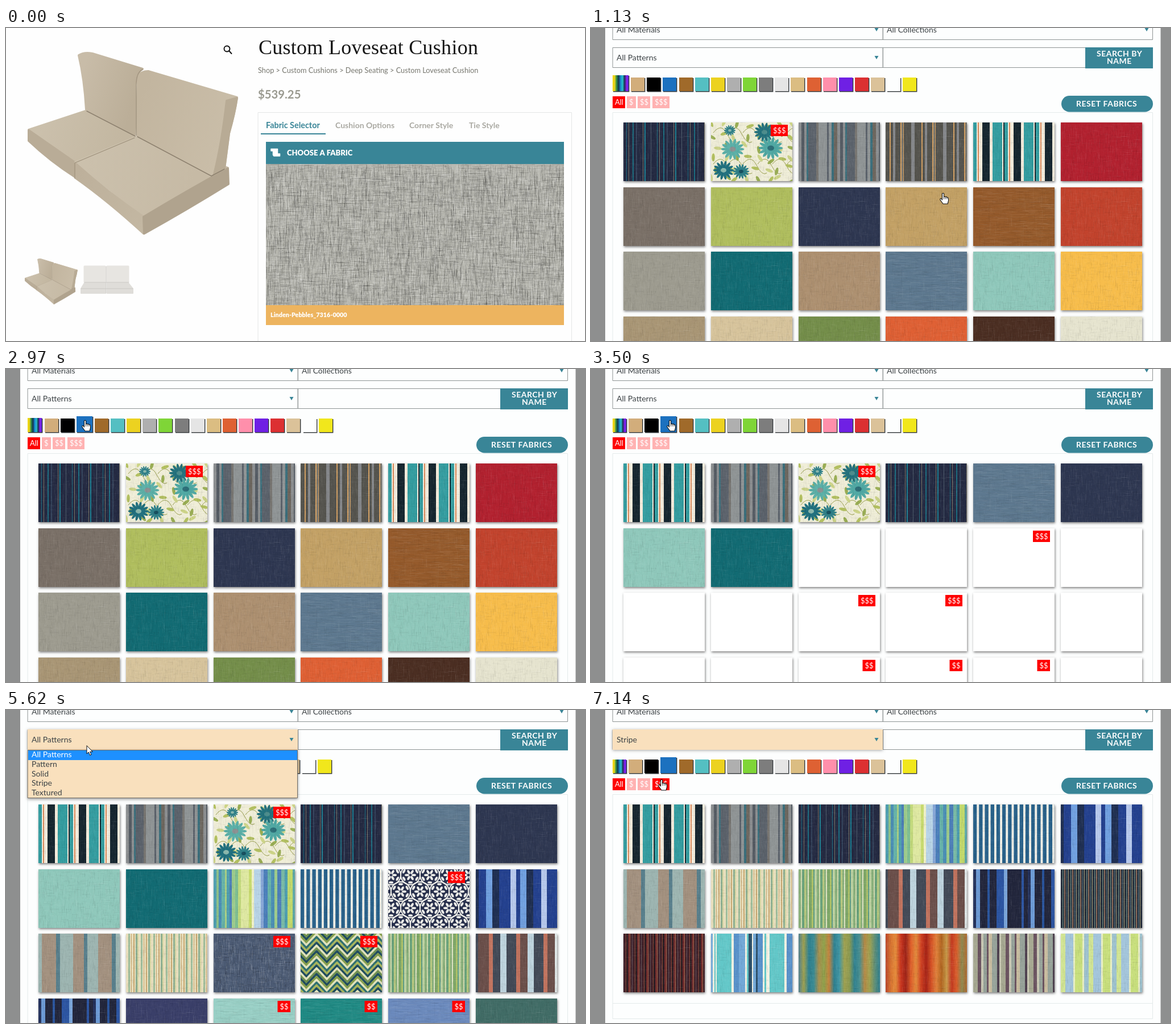
These frames come from a looping animation (1018x550 px, 8 s). An HTML page with a canvas:

```html
<!DOCTYPE html>
<html lang="en">
<head>
<meta charset="utf-8">
<title>Custom cushion fabric selector</title>
<style>
html, body { margin: 0; width: 100%; height: 100%; overflow: hidden; background: #fff; }
canvas { display: block; }
</style>
</head>
<body>
<canvas id="stage" width="1018" height="550"></canvas>
<script>
const W = 1018, H = 550, LOOP = 8000;
const TEAL = '#398597', RED = '#fe0000';
const TILE_W = 143, TILE_H = 103;
const screen2d = document.getElementById('stage').getContext('2d');
let g = screen2d; // current drawing context

const clamp = v => Math.max(0, Math.min(1, v));
const ramp = (t, from, to) => { const p = clamp((t - from) / (to - from)); return p * p * (3 - 2 * p); };

function random(seed) {
  return () => (seed = seed * 16807 % 2147483647) / 2147483647;
}

function layer(w, h, paint) {
  const c = document.createElement('canvas'), outer = g;
  c.width = w; c.height = h;
  g = c.getContext('2d');
  paint();
  g = outer;
  return c;
}

function rect(color, x, y, w, h) { g.fillStyle = color; g.fillRect(x, y, w, h); }

function frame(color, x, y, w, h) {
  g.strokeStyle = color; g.lineWidth = 1;
  g.strokeRect(x + .5, y + .5, w - 1, h - 1);
}

function shape(d, fill, stroke, width = 1) {
  const path = new Path2D(d);
  g.lineJoin = 'round'; g.lineCap = 'round';
  if (fill) { g.fillStyle = fill; g.fill(path); }
  if (stroke) { g.strokeStyle = stroke; g.lineWidth = width; g.stroke(path); }
}

function disc(color, x, y, rx, ry = rx, turn = 0) {
  g.fillStyle = color;
  g.beginPath(); g.ellipse(x, y, rx, ry, turn, 0, 7); g.fill();
}

function text(str, x, y, size, color, weight = 400, spacing = 0, family = 'Lato, sans-serif') {
  g.font = `${weight} ${size}px ${family}`;
  g.letterSpacing = spacing + 'px';
  g.fillStyle = color;
  g.fillText(str, x, y);
}

function shadow(color, blur, dx = 0, dy = 0) {
  g.shadowColor = color; g.shadowBlur = blur;
  g.shadowOffsetX = dx; g.shadowOffsetY = dy;
}
const noShadow = () => shadow('transparent', 0);

// Short light and dark threads laid over a cloth colour.
function weave(w, h, power, upright = .6, long = 12, density = 7) {
  const rnd = random(w * 31 + h);
  for (let i = w * h / density; i > 0; i--) {
    const tone = rnd() < .5 ? '0,0,0' : '255,255,255';
    const len = 2 + rnd() * long, up = rnd() < upright;
    rect(`rgba(${tone},${rnd() * power})`, rnd() * w | 0, rnd() * h | 0, up ? 1 : len, up ? len : 1);
  }
}

// Repeating stripes: "colour width colour width ..."
const STRIPES = {
  teal: '349da0 6 f3ecdc 2 d98a5c 2 f3ecdc 6 16262f 13 f3ecdc 5 349da0 17 f3ecdc 2 16262f 2',
  gray: '8b8e90 5 555c64 5 8b8e90 4 3b6f7c 3 5b626b 14 777571 4 8f9495 15 5b626b 3 8f9495 5 3b6f7c 4 6d675f 6',
  navy: '242a42 5 1c6d80 1 242a42 3 777364 1 242a42 6 1c6d80 2 242a42 4 34435c 2 242a42 10 777364 1 242a42 2 1c7d90 2 242a42 9 4c5a6a 1 242a42 5',
  brown: '55544e 7 d3a063 2 55544e 4 85878a 4 55544e 9 d3a063 2 77746b 3 d3a063 1 55544e 13 85878a 6 55544e 5',
  multi: '4f9fb0 5 8dc08b 4 4b8fb5 5 66b3a9 6 a8cf86 3 4f9fb0 5 4c7fb8 4 9ccb8c 6 7fbf93 5 c3da7c 5 dfe9a2 14 c9dc70 5 f0f1c8 4 b9d5e8 12 86a6d6 5 4b7fbb 7 66b3a9 6 4b8fb5 6 9ccb8c 5 4c7fb8 7 79bba6 6 4f9fb0 5 c3da6c 9 5fa9a6 4',
  pin: '28618a 6.5 eeeee6 3.7',
  royal: '1f2f52 5 24418f 13 70a0e0 11 1f2f52 12 24418f 20 b6c8ec 10 24418f 7 70a0e0 11 1f2f52 12 24418f 14 b6c8ec 10 24418f 18',
  taupe: '9db5b1 6 a3917f 25 587f8c 7 9db5b1 23 a3917f 19 587f8c 6 9db5b1 19 a3917f 24 587f8c 7 9db5b1 7',
  sage: 'e9dfbd 4 9fbe9c 3 e9dfbd 2 c8a871 1 e9dfbd 3 c8a871 2 e9dfbd 2 8fb193 3 d9d8a4 2',
  meadow: '8bb17c 4 d3dcb0 2 6ba37c 4 b9c97f 3 8bb17c 3 dfe4c4 2 7fa869 5 adc167 3 5d9a85 2 bbd1a0 4',
  rust: '434a57 4 6b4f4a 19 c1735e 7 434a57 13 bed4de 11 434a57 17 c1735e 7 6b4f4a 13 bed4de 11 434a57 17 c1735e 7 6b4f4a 13 dfe6e6 5',
  deep: '24325c 5 6d9bd6 7 22263c 13 28539b 4 22263c 12 2c55a2 13 7aa5da 6 22263c 25 2c55a2 4 22263c 7',
  dark: '232c3a 3 6d8f84 1 2c3744 2 8a6a58 2 232c3a 2 55707a 1 2c3744 2 a39b75 1',
  maroon: '42222a 4 8a4a38 1 2b1c22 3 6d2b2c 3 a4684a 1 42222a 3 5a5058 1',
  lagoon: '73a9d8 3 f2f2e4 3 63c8c9 2 f2f2e4 2 63c8c9 26 f2f2e4 4 5a93cb 9 73a9d8 11 f2f2e4 3 63c8c9 3 2d4f68 6 f2f2e4 2 73a9d8 5 2d4f68 3 5a93cb 9 f2f2e4 3 63c8c9 3 f2f2e4 6 63c8c9 26 f2f2e4 4 5a93cb 12',
  mix: 'a7a992 8 6b5460 6 c9c8b4 4 97a39a 6 6b5460 3 c9bda0 6 97a39a 9 4f4250 4 c9c8b4 3',
  lime: 'd2e594 8 a4c6dc 14 e9efc4 3 c9e07d 13 e9efc4 3 9fc3cf 8'
};

const BLENDS = {
  blur: '4f7f90 a0a251 2f8190 3a8a92 a78f4d 8fa24c c4843f 2f8190 4197a5 a0a251 8d9a50 2f8190 4a8f8f b58a45 a0a251 5e8f78 2f8190',
  fire: 'b9452a d97431 e58b3a c8341d 9e2418 e0602b e28a3c cf4021 a82417 d65326 e0803a b1651f c79a4a c43a20 d9602c 8f8a50 b06a30'
};

function stripes(spec) {
  const parts = spec.split(' ');
  for (let x = 0, i = 0; x < TILE_W; i = (i + 2) % parts.length) {
    const w = +parts[i + 1];
    rect('#' + parts[i], x, 0, w, TILE_H);
    x += w;
  }
}

function blend(spec) {
  const grad = g.createLinearGradient(0, 0, TILE_W, 0);
  spec.split(' ').forEach((c, i, all) => grad.addColorStop(i / (all.length - 1), '#' + c));
  rect(grad, 0, 0, TILE_W, TILE_H);
}

function flower(x, y, r, color, heart) {
  for (let a = 0; a < 6.2; a += .45) {
    disc(color, x + Math.cos(a) * r * .6, y + Math.sin(a) * r * .52, r * .42, r * .13, a);
  }
  disc(heart, x, y, r * .28, r * .22);
}

const PAINTERS = {
  floral() {
    rect('#f0eed8', 0, 0, TILE_W, TILE_H);
    const rnd = random(77);
    for (let i = 0; i < 12; i++) {
      const x = i % 6 * 26 + 4, y = (i / 6 | 0) * 55 + 18;
      shape(`M${x} ${y} q14 -18 24 2 t18 14`, null, '#9aa04e', 1);
    }
    for (let i = 0; i < 48; i++) {
      disc(['#b3c060', '#cdd488', '#9aae54'][i % 3], i % 8 * 19 + rnd() * 12, (i / 8 | 0) * 19 + rnd() * 12, 7, 2.8, rnd() * 6);
    }
    flower(94, 17, 18, '#23717c', '#4b8c8c');
    flower(38, 47, 20, '#5bb0a8', '#8d9394');
    flower(105, 45, 21, '#4fa8a3', '#2d6f78');
    flower(22, 84, 18, '#1f6f7d', '#89b7ac');
    flower(53, 86, 14, '#2d7f88', '#174f5e');
    flower(33, 14, 10, '#2d7f88', '#89b7ac');
  },
  rosette() {
    rect('#272f4c', 0, 0, TILE_W, TILE_H);
    for (let row = -1; row < 5; row++) for (let col = -1; col < 6; col++) {
      const x = col * 34 + (row & 1) * 17 + 5, y = row * 29 + 10;
      for (let k = 0; k < 6; k++) {
        const a = k * Math.PI / 3, c = Math.cos(a), s = Math.sin(a);
        disc('#f1f1ec', x + c * 6, y + s * 6, 4, 2.1, a);
        disc('#f1f1ec', x + Math.cos(a + .52) * 13, y + Math.sin(a + .52) * 13, 4, 2, a + 2.09);
      }
      g.strokeStyle = '#f1f1ec'; g.lineWidth = 2;
      g.beginPath(); g.arc(x, y, 17, 0, 7); g.stroke();
    }
  },
  chevron() {
    rect('#e2e4bd', 0, 0, TILE_W, TILE_H);
    const bands = ['#1f4c5e', '#86a04d', '#e2e4bd', '#2f6f70', '#a7b65b', '#1f4c5e', '#e2e4bd', '#6f9150'];
    for (let y = -30, i = 0; y < 140; y += 5, i++) {
      let d = `M-26 ${y}`;
      for (let k = 0; k < 10; k++) d += ` l18 ${k % 2 ? 19 : -19}`;
      shape(d, null, bands[i % 8], 3.8);
    }
  }
};

const clothCache = {};
function cloth(name) {
  return clothCache[name] ??= layer(TILE_W, TILE_H, () => {
    if (STRIPES[name]) stripes(STRIPES[name]);
    else if (BLENDS[name]) blend(BLENDS[name]);
    else if (PAINTERS[name]) PAINTERS[name]();
    else rect('#' + name.slice(0, 6), 0, 0, TILE_W, TILE_H);
    const flat = name.endsWith('-');
    weave(TILE_W, TILE_H, name === '4c5b74' ? .12 : .045, flat ? .1 : .75, flat ? 24 : 14);
  });
}

const ALL = ('navy floral gray brown teal b2212f 7a7067 b0be5e 2e3751 c3a165 955a2b- c2432d ' +
  '9d9b8f 126b73 ad9070 5d788f- 8fc8bb f7bd4b a99675 d7c49c 748e4a df6034 4b2e22 e6e4cf').split(' ');
const BLUE = ('teal gray floral navy 5d788f- 2e3751 8fc8bb 126b73 multi pin rosette royal ' +
  'taupe sage 4c5b74 chevron meadow rust deep 3a3f69 99d0c6- 1f8a84- 6b8abd- 416c66').split(' ');
const STRIPED = ('teal gray navy multi pin royal taupe sage meadow rust deep dark ' +
  'maroon lagoon blur fire mix lime').split(' ');
const BADGES = { floral: '$$$', rosette: '$$$', '4c5b74': '$$$', chevron: '$$$', '99d0c6-': '$$', '1f8a84-': '$$', '6b8abd-': '$$' };

function tiles(names, loaded) {
  names.forEach((name, i) => {
    const x = Math.round(57 + i % 6 * 153.8), y = Math.round(166 + (i / 6 | 0) * 113.6);
    shadow('rgba(0,0,0,.5)', 4, 1, 2);
    rect('#fff', x, y, TILE_W, TILE_H);
    noShadow();
    if (i < loaded) g.drawImage(cloth(name), x, y);
    const badge = BADGES[name];
    if (badge) {
      const w = badge.length * 7.5 + 7.5;
      rect(RED, x + 135 - w, y + 4, w, 20);
      text(badge, x + 139 - w, y + 19, 13, '#fff');
    }
  });
}

function shade(x0, y0, x1, y1, from, to) {
  const grad = g.createLinearGradient(x0, y0, x1, y1);
  grad.addColorStop(0, from);
  grad.addColorStop(1, to);
  return grad;
}

function sofa() {
  const part = (d, color) => shape(d, color, color, 4);
  part('M40 179 L140 146 L226 190 L122 236 Z', shade(60, 170, 200, 210, '#cbc0ac', '#c3b7a1'));
  part('M40 180 L122 237 L122 262 Q78 234 40 198 Z', '#b9ac97');
  part('M122 236 L228 192 L390 246 Q320 285 242 331 Z', shade(140, 240, 330, 270, '#cbc0ac', '#c6baa5'));
  part('M122 238 Q180 290 242 332 V361 Q180 304 122 263 Z', shade(122, 250, 242, 345, '#bdb09b', '#c3b7a2'));
  part('M242 332 Q320 285 390 247 L391 274 Q320 318 243 361 Z', '#b0a38e');
  shape('M121 264 V237 L226 193', null, '#9d907b', 1.2);
  part('M128 48 Q138 42 152 45 L240 72 Q229 78 227 100 Q230 150 226 188 L141 143 Q138 90 128 48 Z',
    shade(130, 90, 228, 120, '#c8bca8', '#bbae98'));
  part('M232 84 Q238 76 250 76 L406 122 Q402 150 392 185 L384 247 L362 258 Q295 222 231 189 Z',
    shade(232, 130, 385, 180, '#c2b59f', '#c9bda8'));
  part('M388 128 L406 123 Q402 150 392 185 L384 246 L366 257 Q380 200 388 128 Z', '#b8ab95');
  shape('M142 146 L227 190 M231 191 L361 260 L384 248', null, '#8e8270', 1.5);
  shape('M240 73 Q229 78 229 100 V189', null, '#a39681', 1.5);
}

function scaled(x, y, k, paint) {
  g.save(); g.translate(x, y); g.scale(k, k); paint(); g.restore();
}

const page = layer(W, H, () => {
  rect('#fefefe', 0, 0, W, H);
  sofa();
  scaled(23.5, 394.5, .251, sofa);
  shape('M138 419 H174 V446 H138 Z M178 419 H215 V446 H178 Z', '#e7e5e1', '#e7e5e1', 3);
  shape('M138 448 H175 V466 H132 V458 Z M178 448 H215 L223 458 V466 H178 Z', '#dfddd9', '#dfddd9', 2);
  shape('M176 419 V466 M138 447 H216 M132 458 H223', null, '#cbc9c5', 1);
  shape('M393.500 36.500 a5 5 0 1 1 -10 0 a5 5 0 1 1 10 0 M392.500 40.500 L396.500 45', null, '#111', 1.9);

  text('Custom Loveseat Cushion', 444, 46, 36, '#161616', 400, .27, '"Liberation Serif", serif');
  text('Shop > Custom Cushions > Deep Seating > Custom Loveseat Cushion', 443, 79, 12.75, '#77776f');
  text('$539.25', 443, 124, 20.3, '#9a9a90', 700);
  frame('#e4e6e6', 443, 148, 552, 420);
  text('Fabric Selector', 457, 176, 14.4, TEAL, 700);
  text('Cushion Options', 579, 176, 14, '#aaa9a2', 700);
  text('Corner Style', 709, 176, 14, '#aaa9a2', 700);
  text('Tie Style', 814, 176, 14, '#aaa9a2', 700);
  rect(TEAL, 448, 185, 114, 2);

  rect(TEAL, 457, 200, 524, 40);
  shape('M466 212.500 H477.500 V221 H481.500 V225 H471 L469.500 223 V216 H466 Z', '#fff', '#fff', 1.5);
  text('CHOOSE A FABRIC', 494, 224, 13, '#fff', 900);
  const linen = layer(524, 248, () => {
    rect('#b5b5ad', 0, 0, 524, 248);
    weave(524, 248, .14, .72, 22, 4);
  });
  g.drawImage(linen, 457, 239);
  rect('#edb45f', 457, 487, 524, 35);
  text('Linden-Pebbles_7316-0000', 465, 508, 10.8, '#fff', 900);
});

const SWATCHES = ('rainbow d2ad7b 000000 1c71bf a06a2a 54bfc2 ecd220 afafaf 7fd537 7d7d7d e5e5e5 dbbd82 ' +
  'de6133 ff8fab 6f20e4 dc3032 dbc299 fdfefe f1e71c').split(' ');

function swatches(t) {
  const grow = {
    0: 1 - ramp(t, 2760, 3110),
    3: ramp(t, 2090, 2310),
    4: .28 * ramp(t, 1960, 2050) * (1 - ramp(t, 2090, 2200))
  };
  let left = 38;
  SWATCHES.forEach((c, i) => {
    const extra = 4 * (grow[i] || 0), size = Math.round(24 + extra);
    const x = Math.round(left), y = 111 - size;
    let fill = '#' + c;
    if (c === 'rainbow') {
      fill = g.createLinearGradient(x, 0, x + size, 0);
      ['#f1d80d', '#e6d21c', '#2f8e45', '#12344f', '#1788d0', '#28c0c8', '#1c2c50', '#8a22ee', '#5c28e0']
        .forEach((stop, k) => fill.addColorStop(k / 8, stop));
    }
    rect('#33373a', x + 1, y + 1, size + .4, size + .4);
    rect(fill, x, y, size, size);
    left += 28.13 + extra;
  });
}

function priceTag(label, x, w, color) {
  rect(color, x, 120, w, 21);
  text(label, x + 4, 135, 13, '#fff');
}

function caret(x, y) { shape(`M${x - 3.5} ${y - 3} h7 l-3.500 6 Z`, TEAL); }

function patternSelect(t) {
  const warm = ramp(t, 4990, 5250);
  frame('#8f9494', 38, 34, 476, 36);
  if (warm) {
    g.globalAlpha = warm;
    shadow('rgba(0,0,0,.35)', 5, 0, 1);
    rect('#f9e0bd', 38, 34, 475, 36);
    noShadow();
    g.globalAlpha = 1;
  }
  text(t < 6470 ? 'All Patterns' : 'Stripe', 45, 57, 14, '#3c4245');
  caret(502, 52);
}

function dropdown(activeRow) {
  shadow('rgba(0,0,0,.4)', 5, 0, 2);
  rect('#f9e0bd', 38, 70, 475, 85);
  noShadow();
  frame('#6f6a62', 38, 70, 475, 85);
  rect('#1e90ff', 39, 71 + Math.round(activeRow * 16.7), 473, 17);
  ['All Patterns', 'Pattern', 'Solid', 'Stripe', 'Textured'].forEach((label, i) =>
    text(label, 45, 83 + Math.round(i * 16.75), 14, i === activeRow ? '#fff' : '#3c4245'));
}

function modal(t, cursor) {
  rect('#8e8f8f', 0, 0, W, H);
  rect('#fdfefe', 25, 0, 976.5, H);
  frame('#8f9494', 38, -16, 476, 37);
  frame('#8f9494', 513, -16, 475, 37);
  text('All Materials', 45, 8, 14, '#3c4245');
  text('All Collections', 520, 8, 14, '#3c4245');
  caret(502, 3); caret(977, 3);
  frame('#8f9494', 513, 34, 357, 36);
  patternSelect(t);
  rect(TEAL, 869, 34, 119, 37);
  text('SEARCH BY', 889, 50, 14, '#fff', 700, .5);
  text('NAME', 907, 63, 14, '#fff', 700, .5);

  swatches(t);
  priceTag('All', 38, 22, RED);
  priceTag('$', 63, 16, '#ffb2b2');
  priceTag('$$', 82, 22, '#ffb2b2');
  const fade = Math.round(178 * (1 - ramp(t, 6440, 6740)));
  priceTag('$$$', 108, 30, `rgb(255,${fade},${fade})`);

  const filtered = t >= 7070;
  frame('#e4eaea', 38, 148, 950, filtered ? 395 : 420);
  if (filtered) rect('#e4eaea', 38, 515, 950, 1);
  g.fillStyle = TEAL;
  g.beginPath(); g.roundRect(827, 119, 161, 28.5, 14.2); g.fill();
  text('RESET FABRICS', 853, 138, 14, '#fff', 700, .5);

  if (filtered) tiles(STRIPED, t < 7140 ? 11 : 18);
  else if (t >= 3500) tiles(BLUE, t < 3570 ? 8 : 24);
  else tiles(ALL, 24);

  if (t >= 5020 && t < 6470) {
    dropdown(Math.max(0, Math.min(4, Math.floor((cursor.y - 70) / 16.8))));
  }
}

const PATH = [
  [40, 940, 520], [470, 619, 290], [1800, 619, 290], [2050, 147, 90], [2310, 139, 90],
  [4190, 139, 90], [4430, 142, 63], [5620, 142, 63], [6140, 122, 121], [6470, 122, 121], [6740, 124, 122]
];

function cursorAt(t) {
  const next = PATH.findIndex(p => p[0] > t);
  if (next < 1) { const [, x, y] = PATH.at(next); return { x, y }; }
  const [t0, x0, y0] = PATH[next - 1], [t1, x1, y1] = PATH[next];
  const p = ramp(t, t0, t1);
  return { x: x0 + (x1 - x0) * p, y: y0 + (y1 - y0) * p };
}

function drawCursor(t, { x, y }) {
  const hand = t < 5000 ? y > 82 : t >= 6470;
  g.save();
  g.translate(Math.round(x), Math.round(y));
  if (hand) {
    shape('M-1.500 1 Q0 -.500 1.500 1 V7 Q3 5.500 4.300 7 Q6 6 7 7.700 Q9.500 7.500 9.500 10 V13.500 L8 19 H0 L-5 12 Q-5.500 8.500 -3 10 L-1.500 12 Z', '#fff', '#111', 1.1);
    shape('M1.500 7 V10.500 M4.300 7.500 V10.500 M7 8 V10.500', null, '#111', .8);
  } else {
    shape('M0 0 V14 L3.300 11 L5.500 16.500 L8 15.500 L5.700 10.300 H10 Z', '#fff', '#111', 1);
  }
  g.restore();
}

function draw(now) {
  const t = now % LOOP, cursor = cursorAt(t);
  if (t >= 1000) modal(t, cursor);
  const pageAlpha = t < 1000 ? 1 : 1 - clamp((t - 950) / 170);
  if (pageAlpha > 0) {
    g.globalAlpha = pageAlpha;
    g.drawImage(page, 0, 0);
    g.globalAlpha = 1;
  }
  if (t >= 70) drawCursor(t, cursor);
}

const start = performance.now();
function tick() {
  draw(performance.now() - start);
  requestAnimationFrame(tick);
}
[...ALL, ...BLUE, ...STRIPED].forEach(cloth);
tick();
</script>
</body>
</html>
```
